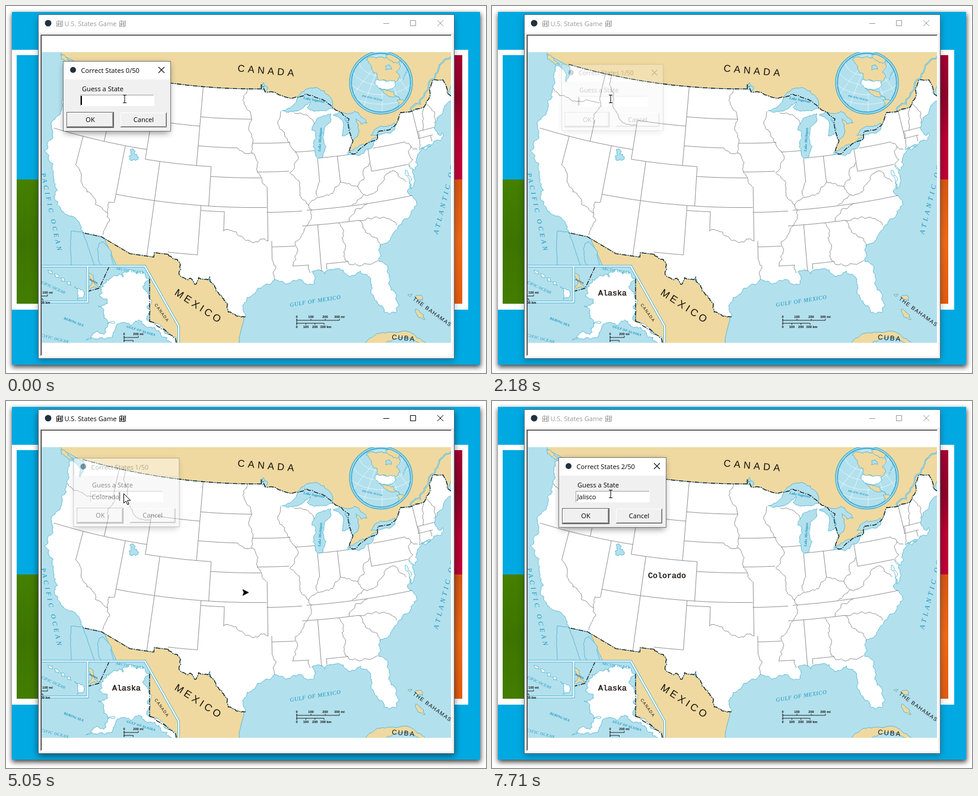
Recreate the animation shown at these times as an HTML page. Size 809 by 620 pixels, loop 8000 ms.

```html
<!DOCTYPE html>
<html lang="en">
<head>
<meta charset="utf-8">
<title>U.S. States Game</title>
<style>
html, body { margin: 0; width: 100%; height: 100%; overflow: hidden; background: #fff; }
svg { display: block; width: 100vw; height: 100vh; }
.ui { font: 11.1px "Open Sans", "Noto Sans", sans-serif; }
.sea { font-family: "Liberation Serif", serif; font-style: italic; fill: #0d93bf; }
.land { font-family: "Liberation Sans", sans-serif; fill: #111; }
.pen { font: 13.33px "Liberation Mono", monospace; fill: #1c120c; stroke: #1c120c; stroke-width: .45; }
.bold { font-weight: bold; }
.coast { stroke: #43afd0; stroke-width: .8; }
.line { fill: none; stroke: #858585; stroke-width: .9; }
.border { fill: none; stroke: #111; stroke-width: 1.3; stroke-dasharray: 8 2 1.5 2; }
.water { fill: #b3e0ed; }
.tan { fill: #efd9a0; }
.white { fill: #fff; }
</style>
</head>
<body>
<svg id="stage" viewBox="0 0 809 620" xmlns="http://www.w3.org/2000/svg"></svg>
<script>
const stage = document.getElementById('stage');
const parse = s => s.trim().split(/\s+/).map(p => p.split(',').map(Number));
const path = (p, end = '') => 'M' + p.map(q => q.map(v => +v.toFixed(1)).join()).join('L') + end;

// Conic map projection: longitude and latitude to stage pixels.
function project([lon, lat]) {
  const r = 1248 - (lat - 37) * 16.7, a = (lon + 96) * .603 * Math.PI / 180;
  return [421 + r * Math.sin(a), r * Math.cos(a) - 907.5];
}
// Midpoint displacement, seeded by the end points so shared edges agree.
function split(a, b, amp) {
  const dx = b[0] - a[0], dy = b[1] - a[1];
  if (Math.hypot(dx, dy) < 3.5) return [b];
  const n = Math.sin(a[0] * 12.99 + a[1] * 78.23 + b[0] * 37.7 + b[1] * 9.1) * 4375.85;
  const k = (n - Math.floor(n) - .5) * amp;
  const m = [(a[0] + b[0]) / 2 - dy * k, (a[1] + b[1]) / 2 + dx * k];
  return [...split(a, m, amp), ...split(m, b, amp)];
}
const rough = (p, amp) => p.slice(1).reduce((out, q, i) => out.concat(split(p[i], q, amp)), [p[0]]);
const geo = (s, amp = .5) => rough(parse(s).map(project), amp);
const parallel = (lat, a, b) => Array.from({ length: 13 }, (_, i) => project([a + (b - a) * i / 12, lat]));
const meridian = (lon, a, b) => [project([lon, a]), project([lon, b])];

const draw = (p, cls, end) => `<path class="${cls}" d="${path(p, end)}"/>`;
const area = (s, cls, amp = .5) => { const p = parse(s); return draw(rough([...p, p[0]], amp), 'coast ' + cls, 'Z'); };
const lake = s => draw(geo(s, .35), 'coast water', 'Z');
const rect = (x, y, w, h, fill, more = '') => `<rect x="${x}" y="${y}" width="${w}" height="${h}" fill="${fill}" ${more}/>`;
const stroke = (d, color, w = 1) => `<path d="${d}" fill="none" stroke="${color}" stroke-width="${w}"/>`;
const label = (x, y, turn, text, size, gap, cls = 'sea', anchor = 'start') =>
  `<text class="${cls}" transform="translate(${x} ${y}) rotate(${turn})" font-size="${size}" letter-spacing="${gap}" text-anchor="${anchor}">${text}</text>`;

// Outline of the country as longitude,latitude pairs, clockwise.
const west = geo('-117.1,32.5 -118.4,33.8 -120.6,34.5 -121.9,36.6 -122.6,37.8 -123.7,38.9 -124.4,40.4 -124.1,41.5 -124.5,42.8 -124,44.5 -124,46.2 -124.7,48.4 -122.9,48.1 -122.5,47.2 -122.3,48 -122.8,49');
const north = parallel(49, -122.8, -95.15);
const lakes = geo('-95.15,49 -95.15,49.4 -94.6,48.7 -93,48.6 -91.5,48.1 -89.6,48 -88.4,48.3 -84.9,46.9 -83.6,46.1 -82.5,45.3 -82.4,43 -83.1,42 -82.5,41.7 -79,42.8 -78.7,43.6 -76.8,43.6 -75,45 -71.5,45 -70.3,45.9 -70,46.7 -69.2,47.4 -67.8,47.07 -67.8,45.7 -67,44.8', .2);
const east = geo('-67,44.8 -68.8,44.4 -70.2,43.6 -70.9,42.5 -70.5,41.8 -70,42 -70.1,41.6 -71.4,41.4 -73.7,40.9 -72,41 -74,40.5 -74.9,39 -75.5,39.6 -75.1,38.5 -75.9,37.2 -76.1,39.2 -76.4,37 -75.9,36.5 -75.6,35.5 -76.6,34.7 -77.9,33.9 -79.2,33.1 -81.2,31.8 -81.4,30.6 -80.6,28.4 -80.05,26.8 -80.4,25.2');
const gulf = geo('-80.4,25.2 -81.1,25.15 -81.8,26.1 -82.8,27.8 -82.7,28.8 -83.7,29.9 -85.3,29.7 -86.4,30.4 -89.4,30.3 -89.2,29.1 -90.1,29.1 -91.4,29.5 -93.8,29.7 -95,29.1 -97,27.9 -97.4,27.2 -97.15,25.95');
const rio = geo('-97.15,25.95 -99.1,26.4 -99.5,27.5 -100.3,28.3 -101.4,29.8 -102.7,29.7 -103.1,29 -104.5,29.6 -105,30.7 -106.5,31.78');
const south = geo('-106.5,31.78 -108.2,31.78 -108.2,31.33 -111.07,31.33 -114.8,32.5 -117.1,32.5', 0);

// State lines: a latitude with two longitudes, or the reverse.
const parallels = [
  [42, -124.2, -111.05], [45, -111.05, -104.05], [45.94, -104.05, -96.56], [43, -104.05, -98.5], [41, -111.05, -102.05],
  [40, -102.05, -95.3], [37, -114.05, -94.6], [36.5, -103, -100], [36.5, -94.6, -90.1], [35, -90.2, -83.1], [33, -94.04, -91.2],
  [31, -91.6, -89.7], [31, -87.6, -85], [43.5, -96.45, -91.2], [40.6, -95.8, -91.5], [42.5, -90.6, -87.8], [36.55, -89.5, -75.9],
  [39.72, -80.52, -75.6], [42, -79.8, -75.35], [42.73, -73.3, -70.9], [42.03, -73.5, -71.4], [41.72, -87.4, -83.4],
  [46, -119, -116.95], [32, -106.6, -103.03]
];
const meridians = [
  [-120, 42, 39], [-114.05, 42, 36.2], [-117.03, 42, 44.2], [-117.03, 46.4, 49], [-116.05, 48, 49], [-111.05, 41, 45],
  [-109.05, 31.35, 41], [-104.05, 41, 49], [-102.05, 37, 41], [-103.03, 32, 37], [-100, 34.56, 36.5], [-94.5, 33.6, 39.1],
  [-94.04, 31.8, 33.6], [-88.25, 30.3, 35], [-87.53, 39.3, 41.7], [-84.8, 39.1, 41.7], [-80.52, 39.72, 42.3],
  [-73.35, 42.05, 45], [-71.7, 41.4, 42.03], [-87.6, 30.4, 31]
];
const westRivers = [
  '-120,39 -114.63,35', '-114.05,36.2 -114.75,36.1 -114.2,34.2 -114.7,32.7', '-116.05,48 -114.3,45.5 -113,44.5 -111.05,44.5',
  '-117,46.4 -116.6,45.7 -117.03,43.8', '-124,46.2 -122.8,45.7 -121,45.6 -119,46', '-98.5,43 -96.5,42.5 -95.8,40.6 -94.6,39.1',
  '-97.2,49 -96.6,46 -96.45,43.5 -96.5,42.5', '-94.04,31.8 -93.6,31 -93.8,29.7', '-100,34.55 -98,34.1 -94.45,33.6',
  '-92.3,46.7 -92.8,45.6 -91.2,43.5 -90.2,41.8 -91.4,40.4 -90.2,38.8 -89.2,37 -91.1,33.5 -91,32.4 -91.6,31', '-89.7,31 -89.6,30.2'
];
const eastRivers = [
  '-90.4,46.5 -88.1,45.8 -87.6,45.1', '-87.53,39.3 -88,37.9', '-89.2,37 -88,37.8 -86,38 -84.8,39.1 -82.6,38.4 -81.7,39 -80.6,40.6',
  '-82.6,38.4 -82,37.5 -80.3,37.6 -79,38.7 -77.8,39.4', '-82,37.5 -83.7,36.6', '-81.7,36.55 -84.3,35',
  '-85.6,35 -85.2,32.9 -84.9,30.7 -82.2,30.5 -81.5,30.7', '-83.1,35 -82,33.5 -81,32.1', '-83.1,35 -81,35.1 -79.7,34.8 -78.6,33.9',
  '-75.35,42 -74.7,41.4 -75.1,40.6 -74.8,40.1 -75.5,39.6', '-71.5,45 -72.3,43.5 -72.5,42.7', '-71.1,45.3 -70.8,43.1',
  '-77.8,39.4 -76.9,38.5 -76.3,38', '-73.3,42.7 -73.6,41', '-74.7,41.4 -73.9,41'
];

function scaleBar(x, y, n, step, unit) {
  let s = stroke(`M${x} ${y}H${x + n * step}M${x} ${y + 5}H${x + n * step * .64}M${x} ${y - 2}v9`, '#111', .9);
  for (let i = 0; i <= n; i++) {
    const value = i * unit, last = i === n;
    s += stroke(`M${x + i * step} ${y}v-2.5M${x + i * step * .64} ${y + 5}v2.5`, '#111', .9);
    s += label(x + i * step, y - 4, 0, value + (last ? ' mi' : ''), 5.6, 0, 'land bold', 'middle');
    s += label(x + i * step * .64 + (last ? 3 : 0), y + 13, 0, value + (last ? ' km' : ''), 5.6, 0, 'land bold', 'middle');
  }
  return s;
}

function globe() {
  const ring = r => `<circle cx="632" cy="129.5" r="${r}" class="water" stroke="#3dabd1" stroke-width="1.3"/>`;
  let s = ring(53) + ring(50).replace('water', 'white') + ring(49.5) + '<g clip-path="url(#ball)">';
  for (let i = 0; i < 5; i++) {
    s += `<ellipse cx="632" cy="93" rx="${20 + i * 17}" ry="${9 + i * 16}" fill="none" stroke="#fff" stroke-width=".6"/>`;
    s += stroke(`M634 90Q${600 + i * 17} 125 ${562 + i * 36} 184`, '#fff', .6);
  }
  s += area('607,91 620,86 646,87 664,104 658,112 664,120 646,130 630,127 616,104', 'tan');
  s += area('640,82 654,82 665,90 659,97 648,92', 'tan') + area('640,101 646,99 650,107 640,108', 'water');
  s += area('624,124 645,127 655,126 657,133 650,140 629,139 622,132', 'white', .3);
  s += area('629,139 639,141 653,145 664,158 648,153 639,149', 'tan') + area('659,159 669,158 680,166 672,182 661,177', 'tan');
  s += label(600, 153, 13, 'PACIFIC OCEAN', 4.4, .1, 'sea bold') + label(670, 125, -66, 'ATLANTIC OCEAN', 3.5, 0);
  return s + '</g>';
}

function insets() {
  const frame = 'M60 439.500H234L291 541V570M137.500 439.500V500H60';
  const panhandle = rough(parse('242,533 254,540 266,546 278,556 287,569'), .4);
  let s = '<path class="water" d="M60 439.500H234L291 541V570H60Z"/><g clip-path="url(#inset)">';
  s += area('242,460 240,430 300,541 300,575 287,569 266,546 242,533', 'tan', 0);
  s += area('160,477 169,462 182,455 207,446 220,453 242,461 242,533 266,546 287,569 258,548 229,533 209,539 202,535 183,550 151,562 135,565 169,551 184,535 165,527 155,507 171,496 158,491', 'white', .65);
  s += area('137,453 143,452 148,461 157,475 140,482', 'tan');
  s += '<path class="border" d="M174 440L157 477L138 482M242 461V533"/>' + draw(panhandle, 'border');
  s += area('115,474 123,477 132,485 129,493 120,496', 'white');
  for (let i = 0; i < 4; i++) {
    const x = 106 - i * 10.5, y = 469 - i * 6.5;
    s += area(`${x - 4},${y - 3} ${x + 3},${y - 2} ${x + 4},${y + 3} ${x - 2},${y + 2}`, 'white', .7);
  }
  s += '</g>' + stroke(frame, '#49b0d3', 4) + stroke(frame, '#fff', 2.2);
  s += label(52, 465, 25, 'PACIFIC OCEAN', 6.8, .2) + label(97, 529, 21, 'BERING SEA', 5.8, .1, 'sea bold');
  s += label(50, 556, 14, 'PACIFIC OCEAN', 6.8, .6) + label(185, 445, 10, 'ARCTIC OCEAN', 6.2, .4);
  s += label(203, 543, 17, 'GULF OF ALASKA', 5.7, .2, 'sea bold') + label(250, 505, 54, 'CANADA', 7, 1.2, 'land');
  return s + label(140, 463, 26, 'RUSSIA', 4, .1, 'land') + scaleBar(199, 560, 1, 24, 200) + scaleBar(48, 490, 1, 22, 100);
}

function map() {
  const nation = [west, north, lakes, east, gulf, rio, south].flat();
  let s = rect(60, 78, 690, 491, '#b3e0ed');
  s += area('90,74 95,83 112,92 128,101 200,135 420,160 470,170 570,260 650,230 700,190 740,160 760,110 760,74', 'tan', 0);
  s += area('92,82 104,88 114,99 100,94', 'tan');
  const river = path(rough(parse('660,190 682,174 705,148 713,129 737,95 752,84'), .4));
  s += stroke(river, '#3eaccd', 2.4) + stroke(river, '#b3e0ed', 1.2);
  s += area('130,382 160,385 164,389 186,438 200,470 291,600 393,575 393,561 397,544 401,530 400,524 385,500 270,405', 'tan', 0);
  s += area('157,401 163,398 178,415 182,441 162,441 154,411', 'water', .25);
  s += area('110,380 130,382 137,402 149,438 110,445', 'water', .1);
  s += draw(nation, 'coast white', 'Z');
  for (const p of parallels) s += draw(parallel(...p), 'line');
  for (const m of meridians) s += draw(meridian(...m), 'line');
  for (const r of [...westRivers, ...eastRivers]) s += draw(geo(r, .4), 'line');
  s += lake('-92.1,46.75 -89.6,48 -88.3,48.8 -86.5,48.75 -85,47.9 -84.6,46.5 -86.5,46.5 -87.5,46.5 -88.4,46.9 -87.8,47.45 -88.6,47.2 -90.5,46.6 -92.1,46.75');
  s += lake('-87.4,41.7 -87.8,42.5 -87.9,43.3 -87.5,44.4 -88,44.6 -86.8,45.8 -85,46.05 -85.1,45.4 -86.2,44.7 -86.5,43.8 -86.2,42.8 -86.8,41.8 -87.4,41.7');
  s += lake('-84.7,45.9 -83.5,46.1 -81.5,46 -80,44.6 -80.9,44.6 -81.5,45.2 -81.3,44.6 -81.7,43.4 -82.4,43 -82.7,43.9 -83.8,43.7 -83.4,45.1 -84.7,45.9');
  s += lake('-83.4,41.7 -83.1,42.1 -81.9,42.3 -80.4,42.6 -78.9,42.9 -79.8,42.2 -81.7,41.5 -83.4,41.7');
  s += lake('-79.8,43.3 -79.2,43.8 -77,43.95 -76.2,44.1 -76.3,43.5 -77.5,43.27 -79.8,43.3');
  s += area('429,137 434,129 441,139 436,143', 'water', .7) + area('209,243 214,241 223,255 218,261', 'water', .7);
  for (const p of [north, lakes, rio, south]) s += draw(p, 'border');
  s += area('604,573 613,561 630,553 650,551 692,560 728,575', 'tan', .3);
  s += area('690,512 697,516 706,530 694,525', 'tan') + area('677,488 685,487 682,491', 'tan') + area('690,492 699,488 702,498', 'tan');
  s += insets() + globe();
  s += label(390, 110.5, 5, 'CANADA', 16.5, 5.3, 'land') + label(283, 487, 33, 'MEXICO', 17, 4.4, 'land');
  s += label(685, 496, 36, 'THE BAHAMAS', 9, 1.3, 'land') + label(650, 563, 5, 'CUBA', 11.5, 2, 'land');
  s += label(479, 508, -9, 'GULF OF MEXICO', 9.4, .7) + label(59, 283, 78, 'PACIFIC OCEAN', 11, 4.5);
  s += label(728, 386, -76, 'ATLANTIC OCEAN', 11.5, 4.8) + label(570, 190, 64, 'Lake Huron', 4.6, 0);
  s += label(501, 157, 11, 'Lake Superior', 6.2, 0, 'sea bold') + label(530, 246, -86, 'Lake Michigan', 6.2, .1, 'sea bold');
  return s + scaleBar(490, 531, 3, 24, 100);
}

const mapIcon = x => `<path d="M${x} 26l3-1 4 1 3-1v9l-3 1-4-1-3 1zM${x + 3} 25v9M${x + 7} 26v9M${x} 29l5 3 5-5M${x + 1} 33l4-5 4 5" fill="none" stroke="currentColor" stroke-width=".9"/>`;

function button(x, w, text, main) {
  return rect(x, 85, w, 27, main ? '#646464' : '#f0f0f0') + rect(x + 1, 86, w - 2, 25, '#f0f0f0')
    + stroke(`M${x + 1.5} 110V86.500H${x + w - 2}`, '#fff')
    + stroke(`M${x + 1} 110.500H${x + w - 1.5}V86`, '#696969') + stroke(`M${x + 2} 109.500H${x + w - 2.5}V87`, '#a0a0a0')
    + `<text x="${x + w / 2}" y="102" text-anchor="middle">${text}</text>`;
}

const dialog = rect(2, 4, 176, 116, '#000', 'filter="url(#soft)" opacity=".48"')
  + rect(-.5, -.5, 181, 118, '#fff', 'stroke="#777"') + rect(0, 30, 180, 87, '#f0f0f0')
  + '<circle cx="16" cy="14" r="5" fill="#20323d"/><g id="close">' + stroke('M160 9l10 10M170 9l-10 10', '#111', 1.1)
  + '</g><text id="count" x="29.5" y="19"></text><text x="31" y="50">Guess a State</text>'
  + rect(29, 56, 124, 19, '#fff') + stroke('M28.500 75V56.500H152', '#a0a0a0')
  + button(5, 80, 'OK', true) + button(95, 80, 'Cancel')
  + '<text id="typed" x="30.5" y="70"></text>' + rect(29, 58, 2, 15, '#000', 'id="caret"');

const gradient = (id, ...colors) => `<linearGradient id="${id}" x2="0" y2="1">${colors.map((c, i) => `<stop offset="${i / (colors.length - 1)}" stop-color="${c}"/>`).join('')}</linearGradient>`;

stage.innerHTML = `
<defs>
  <filter id="soft" x="-20%" y="-20%" width="140%" height="140%"><feGaussianBlur stdDeviation="6"/></filter>
  <filter id="drop" x="-5%" y="-5%" width="110%" height="110%"><feGaussianBlur stdDeviation="4.5"/></filter>
  ${gradient('green', '#458000', '#3d7400', '#437d00')}${gradient('red', '#a80034', '#8e0029', '#ba0035', '#c20039')}${gradient('orange', '#d95713', '#ef6a18', '#e45c0e')}
  <clipPath id="view"><rect x="60" y="78" width="690" height="491"/></clipPath>
  <clipPath id="inset"><path d="M60 439.500H234L291 541V570H60Z"/></clipPath>
  <clipPath id="ball"><circle cx="632" cy="129.5" r="49.5"/></clipPath>
</defs>
${rect(0, 0, 809, 620, '#fff')}
${rect(10, 13, 790, 597, '#000', 'filter="url(#drop)" opacity=".75"')}
${rect(10, 10, 789, 596, '#00a9e2')}
${rect(10, 74, 769, 439, '#fff')}
${rect(18, 83, 360, 210, '#00a9e2')}${rect(18, 293, 360, 210, 'url(#green)')}
${rect(400, 83, 369, 210, 'url(#red)')}${rect(400, 293, 369, 210, 'url(#orange)')}
${rect(54, 19, 702, 580, '#000', 'id="shade" filter="url(#soft)"')}
${rect(54.5, 14.5, 701, 581, '#f0f0f0', 'stroke="#4d6a77"')}
${rect(55, 15, 700, 30, '#fff')}
${rect(59, 49, 692, 542, '#fff')}
${stroke('M751.500 49V591.500H59', '#fff')}${stroke('M58.500 591V48.500H751', '#a0a0a0')}${stroke('M59.500 590V49.500H750', '#333', 1.2)}
<circle cx="71" cy="29" r="5.5" fill="#20323d"/>
<g id="bar" class="ui">${mapIcon(85.5)}${mapIcon(191.5)}
<text x="98.5" y="34" fill="currentColor">U.S. States Game</text>
${stroke('M636 29.500h10M681.500 24.500h9v9h-9zM727 24l10 10M737 24l-10 10', 'currentColor')}</g>
<g clip-path="url(#view)">${map()}</g>
<text id="alaska" class="pen" x="179" y="489">Alaska</text>
<text id="colorado" class="pen" x="263" y="299">Colorado</text>
<path id="turtle" d="M409 323.500l-10-5 2 5-2 5z" stroke="#000" stroke-width=".8"/>
<g id="dialog" class="ui">${dialog}</g>
<path id="beam" d="M197 150.500h6M200 151v12M197 163.500h6" fill="none" stroke="#000"/>
<path id="arrow" d="M198.500 156.500v16l3.700-3.500 2.600 6 2.400-1-2.600-6h5.200z" fill="#fff" stroke="#000"/>`;

const $ = id => document.getElementById(id);
const show = (id, on) => $(id).setAttribute('visibility', on ? 'visible' : 'hidden');

// Each round: dialog opens, bursts of keys [start, ms per key, keys], dialog closes. "<" is backspace.
const rounds = [
  { open: -450, close: 1720, write: 1880, bursts: [[380, 0, 'A'], [920, 130, 'laska']] },
  { open: 2180, close: 5050, write: 5130, bursts: [[3970, 0, 'C'], [4280, 100, 'olorado']] },
  { open: 5300, close: 9000, write: 9000, bursts: [[5990, 0, 'J'], [6150, 80, 'ali'], [6700, 150, '<<'], [7000, 125, 'lis'], [7390, 70, 'co']] }
];
function typed(bursts, t) {
  let text = '';
  for (const [start, step, keys] of bursts)
    [...keys].forEach((key, i) => { if (t >= start + i * step) text = key === '<' ? text.slice(0, -1) : text + key; });
  return text;
}

function update(t) {
  const n = rounds.findLastIndex(r => t >= r.open), round = rounds[n];
  const closing = t >= round.close, score = rounds.filter(r => t >= r.write).length;
  const alpha = closing ? .45 * .25 ** Math.floor((t - round.close) / 75) : Math.min(1, .2 + (t - round.open) / 230 * .8);
  const zoom = closing ? .983 : .93 + alpha * .07;
  const [x, y] = n ? [113, 96] : [97, 94];
  const text = typed(round.bursts, t);
  $('dialog').setAttribute('transform', `translate(${x + 90} ${y + 58.5}) scale(${zoom}) translate(-90 -58.5)`);
  $('dialog').setAttribute('opacity', alpha < .02 ? 0 : alpha);
  $('count').textContent = `Correct States ${n}/50`;
  $('count').setAttribute('fill', closing ? '#666' : '#000');
  $('typed').textContent = text;
  $('caret').setAttribute('x', 29 + (text && $('typed').getComputedTextLength() + 1));
  show('caret', (t - round.open) % 900 < 605 && t < round.write);
  show('close', !closing);
  $('bar').style.color = closing ? '#000' : '#999';
  $('shade').setAttribute('opacity', closing ? .55 : .3);
  show('alaska', score > 0);
  show('colorado', score > 1);
  show('turtle', rounds.some(r => t >= r.write - 80 && t < r.write));
  show('arrow', closing);
  show('beam', !closing);
}
function tick() {
  update(performance.now() % 8000);
  requestAnimationFrame(tick);
}
tick();
</script>
</body>
</html>
```
